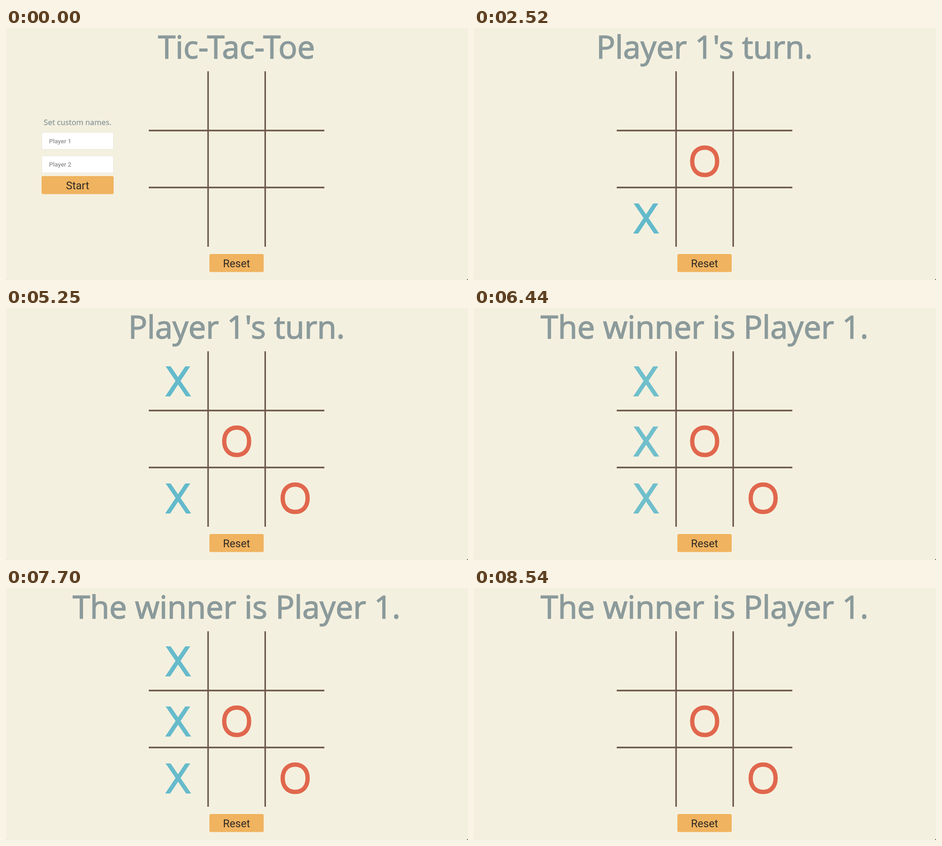
Write an HTML page that moves like this. It is 1013 px wide and 553 px high and loops after 8.61 s.

```html
<!DOCTYPE html>
<html lang="en">
<head>
<meta charset="utf-8">
<title>Tic-Tac-Toe</title>
<style>
  html, body { margin: 0; width: 100%; height: 100%; overflow: hidden; background: #f4f0df; }
  svg { display: block; width: 1013px; height: 553px; }
  text { font-family: Roboto, sans-serif; }
  .slab { font-family: "Open Sans", sans-serif; fill: #8b9a9b; stroke: #8b9a9b; stroke-width: .024em; }
  .mid { text-anchor: middle; }
  .btn { fill: #f0b35f; }
  .label { font-size: 23.6px; fill: #2e2925; text-anchor: middle; }
  .field { fill: #fff; stroke: #e7e3d6; }
  .hint { font-size: 13.7px; fill: #757575; }
  .x { fill: #63bacb; }
  .o { fill: none; stroke: #e0674d; stroke-width: 9.4; }
</style>
</head>
<body>
<svg viewBox="0 0 1013 553">
  <text id="title" class="slab mid" x="505.5" y="66.5" font-size="68.8"></text>
  <path d="M443.1 95V480M568.3 95V480M313 225H698M313 350H698" stroke="#6b574c" stroke-width="3.3"/>
  <g id="form">
    <text class="slab mid" x="157" y="213" font-size="16.8">Set custom names.</text>
    <rect class="field" x="78.5" y="229" width="157" height="37.5"/>
    <rect class="field" x="78.5" y="280.5" width="157" height="37.5"/>
    <text class="hint" x="94.5" y="252.5">Player 1</text>
    <text class="hint" x="94.5" y="304">Player 2</text>
    <rect class="btn" x="78" y="325" width="158" height="39.5" rx="3"/>
    <text class="label" x="157" y="353.5">Start</text>
  </g>
  <rect class="btn" x="446" y="496" width="119" height="39.5" rx="3"/>
  <text class="label" x="505.5" y="525">Reset</text>
  <g id="marks"></g>
  <path d="M1013 550V553H1009Q1012 553 1013 550M0 552V553H1Z" fill="#222"/>
</svg>
<script>
const LOOP = 8610, FADE = 740;
const $ = id => document.getElementById(id);

// Each move: time, mark, cell centre, title shown afterwards
const moves = [
  [1120, "x", 377.5, 418, "Player 2's turn."],
  [2170, "o", 505.8, 292.5, "Player 1's turn."],
  [3220, "x", 377.5, 161, "Player 2's turn."],
  [5180, "o", 634, 417.5, "Player 1's turn."],
  [6370, "x", 377.5, 293, "The winner is Player 1."]
];
const winTime = moves[moves.length - 1][0];

const shapes = {
  x: '<path class="x" d="M-27.5-33h11L28.5 33h-11zM15.5-33h11L-17.5 33h-11z"/>',
  o: '<path class="o" d="M0-30C17-30 27.3-18 27.3 0S17 30 0 30S-27.3 18-27.3 0S-17-30 0-30z"/>'
};
$("marks").innerHTML = moves.map(([, mark, x, y]) =>
  `<g transform="translate(${x} ${y})">${shapes[mark]}</g>`).join("");
const marks = [...$("marks").children];

// The CSS "ease" curve, solved by bisection
function ease(p) {
  let lo = 0, hi = 1, s;
  for (let i = 0; i < 24; i++) {
    s = (lo + hi) / 2;
    if (0.75 * s * (1 - s) + s ** 3 < p) lo = s; else hi = s;
  }
  return 0.3 * s * (1 - s) ** 2 + 3 * s * s * (1 - s) + s ** 3;
}

function blink(t) {
  if (t < 0) return 1;
  const p = t / FADE % 2;
  return p < 1 ? 1 - ease(p) : ease(p - 1);
}

function draw(now) {
  const t = now % LOOP;
  const glow = blink(t - winTime);
  let title = "Tic-Tac-Toe";
  moves.forEach(([time, mark, , , text], i) => {
    const played = t >= time;
    if (played) title = text;
    marks[i].setAttribute("opacity", !played ? 0 : mark === "x" ? glow : 1);
  });
  $("title").textContent = title;
  $("form").setAttribute("visibility", t < moves[0][0] ? "visible" : "hidden");
  requestAnimationFrame(draw);
}
draw(0);
</script>
</body>
</html>
```
